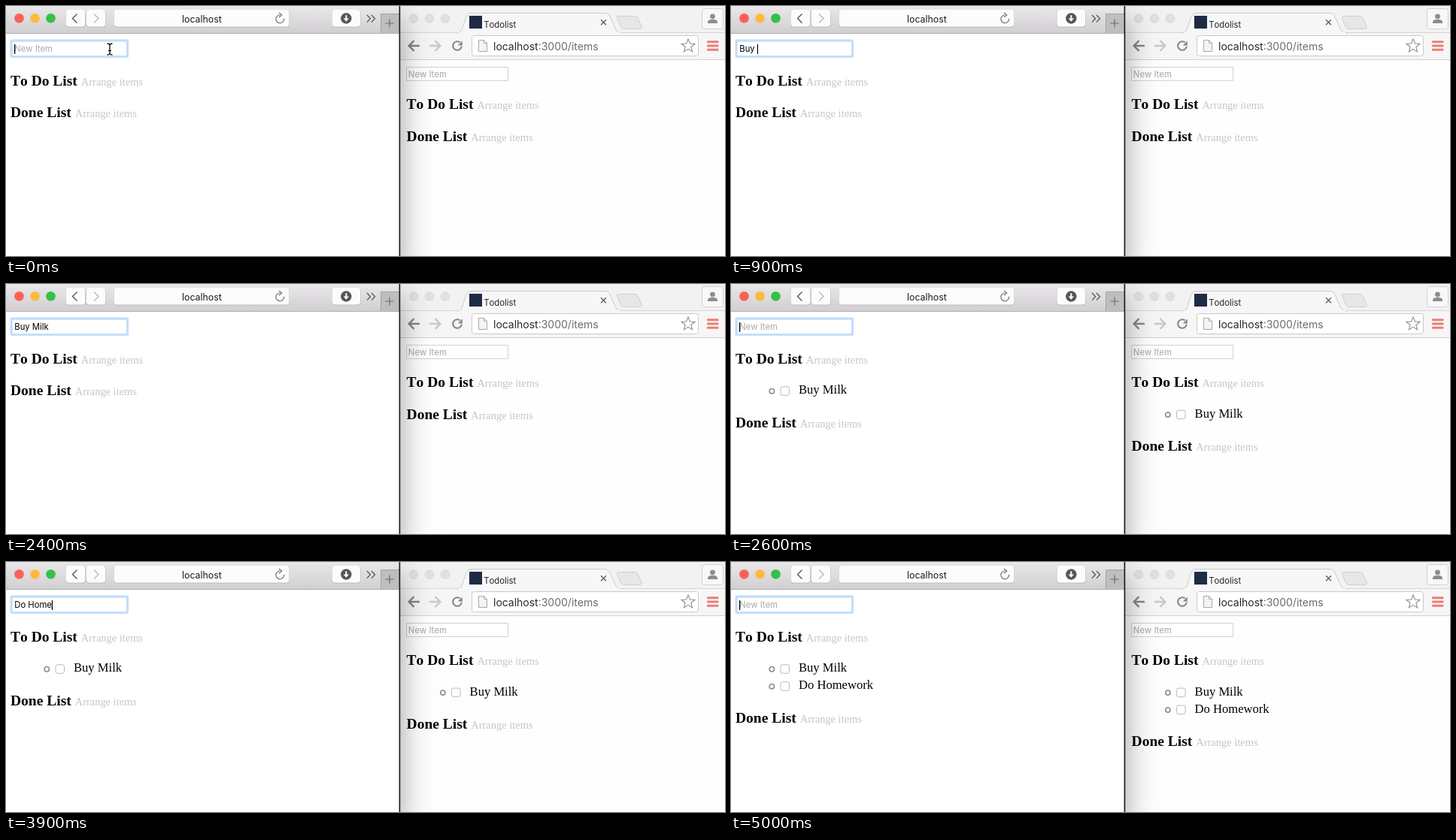
These frames come from a looping animation (956x333 px, 5.1 s). An HTML page with a canvas:

```html
<!DOCTYPE html>
<html lang="en">
<head>
<meta charset="utf-8">
<title>Todolist</title>
<style>
  html, body { margin: 0; width: 100%; height: 100%; overflow: hidden; background: #fff; }
  canvas { display: block; width: 956px; height: 333px; }
</style>
</head>
<body>
<canvas id="stage" width="956" height="333"></canvas>
<script>
const LOOP = 5100;
const SANS = 'Inter, sans-serif';
const SERIF = '"Liberation Serif", serif';
const ctx = document.getElementById('stage').getContext('2d');
ctx.fontKerning = 'none';

// Each key press lists when its character appears.
const tasks = [
  { name: 'Buy Milk', keys: [400, 500, 700, 800, 1100, 1300, 1400, 1600], sent: 2600 },
  { name: 'Do Homework', keys: [3100, 3200, 3400, 3500, 3600, 3700, 3900, 4000, 4100, 4200, 4300], sent: 4700 }
];

function text(str, x, y, size, color, family = SANS, weight = 400) {
  ctx.font = `${weight} ${size}px ${family}`;
  ctx.fillStyle = color;
  ctx.fillText(str, x, y);
  return ctx.measureText(str).width;
}

function rect(x, y, w, h, fill) {
  ctx.fillStyle = fill;
  ctx.fillRect(x, y, w, h);
}

function paint(fill, stroke, width = 1) {
  if (fill) { ctx.fillStyle = fill; ctx.fill(); }
  if (stroke) { ctx.strokeStyle = stroke; ctx.lineWidth = width; ctx.stroke(); }
}

function box(x, y, w, h, r, fill, stroke, width) {
  ctx.beginPath();
  ctx.roundRect(x, y, w, h, r);
  paint(fill, stroke, width);
}

function disc(x, y, r, fill, stroke, width) {
  ctx.beginPath();
  ctx.arc(x, y, r, 0, Math.PI * 2);
  paint(fill, stroke, width);
}

function shape(d, fill, stroke, width) {
  const path = new Path2D(d);
  if (fill) { ctx.fillStyle = fill; ctx.fill(path); }
  if (stroke) { ctx.strokeStyle = stroke; ctx.lineWidth = width || 1; ctx.stroke(path); }
}

function gradient(x0, y0, x1, y1, ...colors) {
  const g = ctx.createLinearGradient(x0, y0, x1, y1);
  colors.forEach((c, i) => g.addColorStop(i / (colors.length - 1), c));
  return g;
}

function windowShadow() {
  ctx.save();
  ctx.shadowColor = 'rgba(0,0,0,.4)';
  ctx.shadowBlur = 40;
  ctx.shadowOffsetY = 16;
  rect(0, 0, 523, 340, '#fff');
  ctx.restore();
}

function leftChrome() {
  rect(0, 0, 523, 36, gradient(0, 0, 0, 36, '#e9e7e9', '#d1cfd1'));
  rect(0, 36, 523, 1, '#b3b1b3');
  ['#fc6058', '#fdba3f', '#35c146'].forEach((c, i) => disc(17.5 + i * 21, 16.3, 6.3, c));

  const buttons = [[79, 26.5], [106.5, 26], [143, 234], [433, 38.5]];
  for (const [x, w] of buttons) {
    box(x, 5.5, w, 23, 4, '#bdbbbd');
    box(x + 0.5, 5, w - 1, 22.5, 4, '#fcfcfc');
  }
  shape('M94.5 10.5L88.5 16.5L94.5 22.5', null, '#555', 1.4);
  shape('M117 10.5L123 16.5L117 22.5', null, '#b9b9b9', 1.4);
  text('localhost', 234, 21.5, 12.4, '#1c1c1c');

  ctx.beginPath();
  ctx.arc(364.3, 17.3, 5.4, -0.1, Math.PI * 1.5);
  paint(null, '#6b6b6b', 1.1);
  shape('M363 9L366.8 12L363 15', null, '#6b6b6b', 1.1);

  disc(452.3, 16.5, 7.2, '#565656');
  shape('M451.3 12.3h2v4.2h2.7l-3.7 4.2l-3.7 -4.2h2.7z', '#fff');
  shape('M480 12l4.5 4.8l-4.5 4.8M486 12l4.5 4.8l-4.5 4.8', null, '#555', 1.3);

  rect(498, 10, 25, 26, '#bfbdbf');
  shape('M498.5 36V10.5H523', null, '#a5a3a5');
  shape('M504.5 23h11M510 17.5v11', null, '#6b6b6b', 1.2);
}

function rightChrome() {
  rect(523, 0, 433, 36, '#f3f2f3');
  rect(523, 35, 433, 36, '#f7f6f7');
  shape('M523 35.5H956', null, '#d6d5d6');
  for (const x of [542, 563, 584]) disc(x, 16.5, 5.8, '#e2e1e2', '#d6d5d6', 0.8);

  shape('M600 36C606 35 606 32 608 26L612 14Q614 9.5 619 9.5H796Q801 9.5 803 14L810 30Q812 35.5 819 36', '#f8f7f8', '#cbcacb');
  rect(602, 35, 215, 2, '#f8f7f8');
  rect(616, 13, 17, 17, '#1d2b45');
  text('Todolist', 635.3, 29, 11.3, '#252525');
  shape('M791 18.2l7 7M798 18.2l-7 7', null, '#5f5f5f', 1.4);
  shape('M814 13.5H836Q839 13.5 840 16L845 27Q846 30.5 842 30.5H822Q819 30.5 817.5 28L812.5 16Q812 13.5 814 13.5Z', '#e8e7e8', '#d0cfd0');

  box(925.5, 3.5, 28, 27, 3, '#f8f8f8', '#d2d1d2');
  disc(939.5, 13.8, 3.4, '#8d8d8d');
  shape('M933 23v-2.2q1 -3 6.5 -3t6.5 3v2.2z', '#8d8d8d');

  shape('M550 53H536M542.5 46.2L535.7 53L542.5 59.8', null, '#868686', 2.4);
  shape('M563 53H577M570.5 46.2L577.3 53L570.5 59.8', null, '#c9c9c9', 2.4);
  ctx.beginPath();
  ctx.arc(600, 53, 5.8, 0.1, Math.PI * 1.72);
  paint(null, '#868686', 2.1);
  shape('M606.8 46.4v6h-6z', '#868686');

  box(619.5, 39.5, 301, 27, 3, '#fff', '#cbcacb');
  shape('M628.5 45.5h7l4 4v11h-11zM635.5 45.5v4h4', '#f4f4f4', '#a9a9a9');
  const w = text('localhost', 648, 58.5, 14, '#292929');
  text(':3000/items', 648 + w, 58.5, 14, '#6c6c6c');

  ctx.beginPath();
  for (let i = 0; i < 10; i++) {
    const r = i % 2 ? 4.1 : 9.4, a = i * Math.PI / 5 - Math.PI / 2;
    ctx.lineTo(907 + r * Math.cos(a), 53.3 + r * Math.sin(a));
  }
  ctx.closePath();
  paint('#fff', '#8c8c8c', 1.1);
  for (const y of [46.3, 51.5, 56.7]) box(932, y, 15.5, 3, 1, '#ec7f76');
  rect(523, 71, 433, 1, '#d2d1d2');
}

function lists(x, y, items) {
  const heading = (title, baseline) => {
    const w = text(title, x, baseline, 19.5, '#000', SERIF, 700);
    text('Arrange items', x + w + 5, baseline, 14.45, '#c6c6c6', SERIF);
  };
  heading('To Do List', y);
  items.forEach((item, i) => {
    const base = y + 40.4 + i * 23;
    disc(x + 48.3, base - 3.6, 3.2, null, '#8b8b8b', 1.5);
    box(x + 60, base - 9.6, 11.5, 11.5, 2.5, '#fff', '#b9b9b9');
    text(item, x + 84, base, 16.58, '#000', SERIF);
  });
  heading('Done List', y + 42.2 + (items.length ? 19.3 + items.length * 23 : 0));
}

function pointer(x, y) {
  const d = `M${x - 3.5} ${y - 7.5}q3.5 0 3.5 2.5v10q0 2.5 -3.5 2.5M${x + 3.5} ${y - 7.5}q-3.5 0 -3.5 2.5v10q0 2.5 3.5 2.5M${x - 2} ${y + 2}h4`;
  shape(d, null, '#fff', 3);
  shape(d, null, '#111', 1.3);
}

function focusedInput(t) {
  box(5.3, 44.3, 158, 25, 3, '#c9e3fd');
  box(7, 46, 154.6, 21.6, 1.5, '#b9d9fa');
  rect(8.5, 47.5, 151.6, 18.6, '#fff');

  const task = tasks.find(k => t < k.sent);
  const count = task ? task.keys.filter(k => k <= t).length : 0;
  const typed = count ? task.name.slice(0, count) : '';
  const width = text(typed || 'New Item', 11.3, 61.4, 11.25, typed ? '#000' : '#a9a9a9');

  // The caret stays lit after every edit, then blinks.
  const edits = [0, ...tasks.flatMap(k => [...k.keys, k.sent])];
  const idle = t - Math.max(...edits.filter(e => e <= t));
  if (idle % 1000 < 500) rect(typed ? 11.3 + width : 11, 51, 1.2, 13, '#000');
  if (t < tasks[0].keys[0]) pointer(138, 57.5);
}

function draw(t) {
  const items = tasks.filter(k => t >= k.sent).map(k => k.name);
  rect(0, 0, 956, 333, '#fefeff');

  rightChrome();
  box(532.5, 81.5, 135, 18, 0, '#fff', '#d2d2d2');
  text('New Item', 534.8, 95, 11.4, '#a9a9a9');
  lists(532.6, 137.3, items);

  windowShadow();
  leftChrome();
  rect(522.6, 0, 1.6, 333, '#161616');
  focusedInput(t);
  lists(6, 106, items);
}

function tick() {
  draw(performance.now() % LOOP);
  requestAnimationFrame(tick);
}
tick();
</script>
</body>
</html>
```
